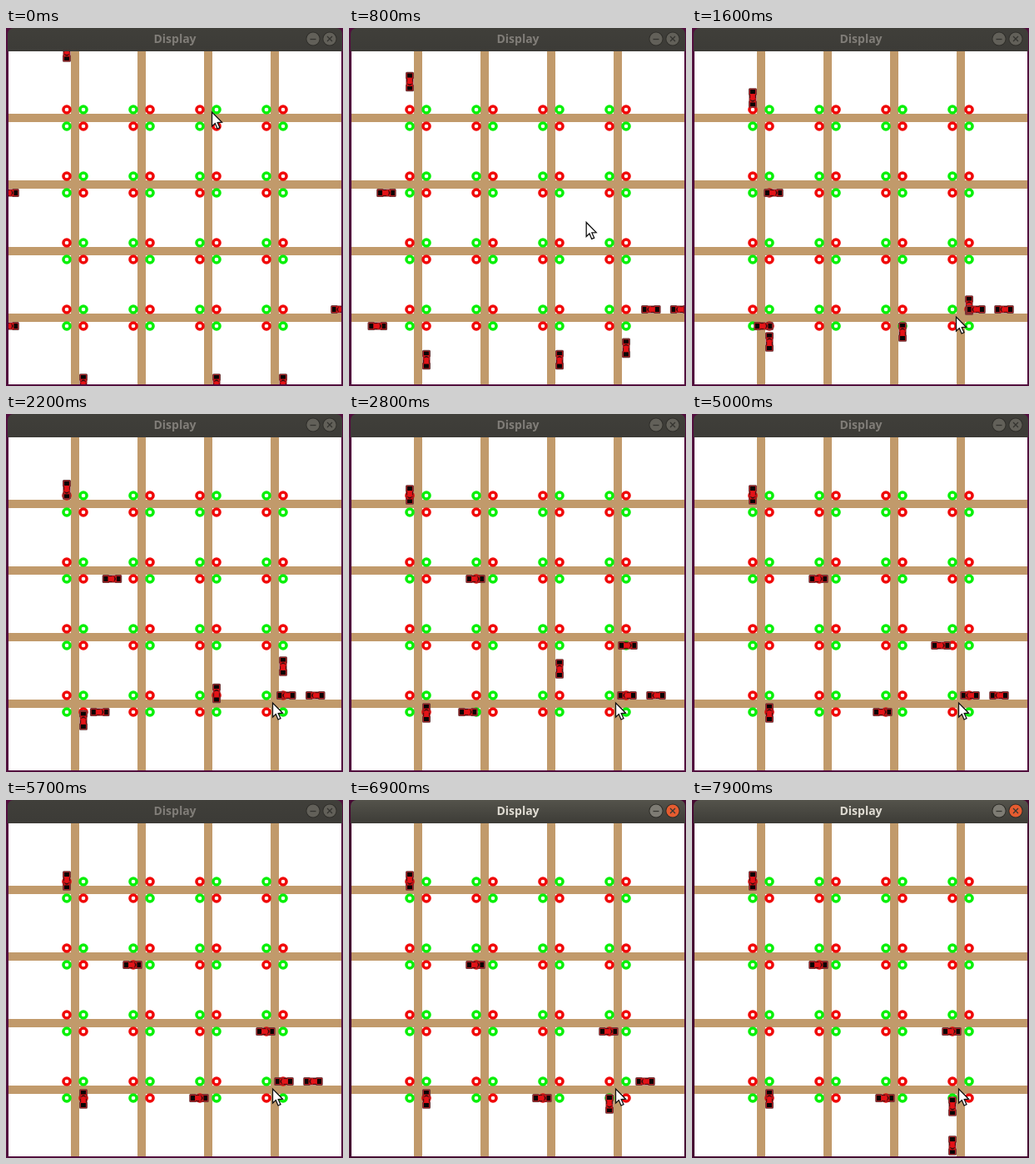
These frames come from a looping animation (405x430 px, 8000 ms). An HTML page with a canvas:

```html
<!DOCTYPE html>
<html>
<head>
<meta charset="utf-8">
<style>
  html, body { margin: 0; width: 405px; height: 430px; overflow: hidden; }
  canvas { display: block; }
</style>
</head>
<body>
<canvas id="stage" width="405" height="430"></canvas>
<script>
const ctx = document.getElementById('stage').getContext('2d');
const LOOP = 8000, STEP = 100;
const ROAD = '#c19a6b', RED = '#f00808', GREEN = '#08f008';
const RIGHT = 0, DOWN = 90, LEFT = 180, UP = -90;

// Keyframes: time, x, y, heading
const cars = [
  [[0, 73, 29, DOWN], [900, 73, 69, DOWN], [1600, 73, 84, DOWN], [1800, 73, 86, DOWN], [2700, 73, 97, DOWN]],
  [[0, 4, 198, RIGHT], [900, 50, 198, RIGHT], [1600, 98, 198, RIGHT], [2700, 152, 198, RIGHT]],
  [[0, 4, 358, RIGHT], [900, 38, 358, RIGHT], [1600, 86, 358, RIGHT], [2700, 135, 358, RIGHT], [2800, 143, 358, RIGHT],
   [3600, 190, 358, RIGHT], [3700, 201, 358, RIGHT], [4500, 219, 358, RIGHT], [5000, 229, 358, RIGHT], [5400, 232, 358, RIGHT]],
  [[0, 93, 427, UP], [900, 93, 395, UP], [1600, 93, 377, UP], [1800, 93, 375, UP], [2700, 93, 359, UP]],
  [[0, 253, 427, UP], [900, 253, 395, UP], [1600, 253, 365, UP], [2800, 253, 306, UP], [3500, 253, 282, UP],
   [3700, 252, 278, RIGHT], [5000, 299, 278, RIGHT], [5400, 307.5, 278, RIGHT], [5700, 312, 278, RIGHT]],
  [[0, 333, 427, UP], [900, 333, 379, UP], [1600, 333, 333, UP], [2600, 333, 283, UP], [2800, 335, 278, RIGHT],
   [3600, 378, 278, RIGHT], [3700, 386, 278, RIGHT], [4300, 420, 278, RIGHT]],
  [[0, 402, 338, LEFT], [900, 358, 338, LEFT], [1600, 341, 338, LEFT], [1800, 339, 338, LEFT], [2700, 334, 338, LEFT],
   [6600, 334, 338, LEFT], [6700, 324, 342, 150], [6900, 313, 365, DOWN], [7500, 313, 396, DOWN], [7900, 313, 415, DOWN]],
  [[0, 435, 338, LEFT], [900, 393, 338, LEFT], [1600, 375, 338, LEFT], [1800, 374, 338, LEFT], [2700, 369, 338, LEFT],
   [6600, 369, 338, LEFT], [6900, 356, 338, LEFT], [7300, 332, 338, LEFT], [7500, 318.5, 350, 135],
   [7700, 313, 360, DOWN], [7900, 313, 368, DOWN]]
];
const pointer = [[0, 247, 101], [100, 247, 101], [1400, 317, 347], [1600, 317, 347], [1800, 320, 347]];

function sample(keys, t) {
  const next = keys.findIndex(k => k[0] > t);
  if (next < 0) return keys[keys.length - 1].slice(1);
  const a = keys[next - 1], b = keys[next], p = (t - a[0]) / (b[0] - a[0]);
  return a.slice(1).map((v, i) => v + (b[i + 1] - v) * p);
}

function rect(color, x, y, w, h) {
  ctx.fillStyle = color;
  ctx.fillRect(x, y, w, h);
}

function shape(color, points) {
  ctx.fillStyle = color;
  ctx.beginPath();
  points.forEach(([x, y]) => ctx.lineTo(x, y));
  ctx.closePath();
  ctx.fill();
}

function disc(color, x, y, r) {
  ctx.fillStyle = color;
  ctx.beginPath();
  ctx.arc(x, y, r, 0, 7);
  ctx.fill();
}

function mix(a, b, p) {
  return `rgb(${a.map((v, i) => Math.round(v + (b[i] - v) * p))})`;
}

function light(x, y, green) {
  disc(green ? GREEN : RED, x, y, 5.8);
  disc('#fff', x, y, 2.3);
}

// Straight-through traffic shares a colour on each diagonal of a crossing.
function diagonalGreen(col, row, t) {
  if (row === 0) return col % 2 === 1;
  if (col === 1 && row === 3) return t < 2400;
  if (col === 3 && row === 3) return t < 6700;
  return col > 0;
}

function drawMap(t) {
  rect('#fff', 3, 28, 400, 400);
  for (let i = 0; i < 4; i++) {
    rect(ROAD, 78 + 80 * i, 28, 10, 400);
    rect(ROAD, 3, 103 + 80 * i, 400, 10);
  }
  for (let col = 0; col < 4; col++) {
    for (let row = 0; row < 4; row++) {
      const x = 83 + 80 * col, y = 108 + 80 * row, on = diagonalGreen(col, row, t);
      light(x - 10, y - 10, on);
      light(x + 10, y + 10, on);
      light(x + 10, y - 10, !on);
      light(x - 10, y + 10, !on);
    }
  }
}

function drawCar([x, y, heading]) {
  ctx.save();
  ctx.translate(x, y);
  ctx.rotate(heading * Math.PI / 180);
  ctx.fillStyle = '#70383a';
  ctx.beginPath();
  ctx.roundRect(-11.8, -5, 8.5, 10, 1.5);
  ctx.roundRect(3.3, -5, 8.5, 10, 1.5);
  ctx.fill();
  rect('#7c2022', -5, -4.5, 10, 9);
  rect('#cb1114', -10.5, -3.7, 21, 7.4);
  rect('#080505', -10, -3, 5, 6);
  rect('#080505', 5.5, -3, 4.5, 6);
  rect('#e31318', -4.5, -2.2, 8.5, 4.4);
  shape('#35100f', [[2, -3.5], [4.5, -1], [4.5, 1], [2, 3.5], [3, 0]]);
  rect('#521111', -4, -4, 4, 1);
  rect('#521111', -4, 3, 4, 1);
  ctx.restore();
}

function drawPointer([x, y]) {
  ctx.save();
  ctx.translate(x, y);
  ctx.beginPath();
  [[0.5, 0], [0.5, 17], [4.3, 13.5], [7, 20], [10, 18.7], [7.2, 12.5], [12.5, 12.2]].forEach(p => ctx.lineTo(...p));
  ctx.closePath();
  ctx.fillStyle = '#fff';
  ctx.strokeStyle = '#111';
  ctx.lineWidth = 1.3;
  ctx.fill();
  ctx.stroke();
  ctx.restore();
}

function button(x, fill, edge) {
  disc(edge, x, 13, 8.6);
  disc(fill, x, 13, 7.6);
}

function glyph(color, ...lines) {
  ctx.strokeStyle = color;
  ctx.lineWidth = 1.3;
  ctx.beginPath();
  for (const [x1, y1, x2, y2] of lines) {
    ctx.moveTo(x1, y1);
    ctx.lineTo(x2, y2);
  }
  ctx.stroke();
}

function drawFrame(focus) {
  rect(mix([82, 14, 62], [70, 9, 50], focus), 0, 0, 405, 430);
  const bar = ctx.createLinearGradient(0, 0, 0, 28);
  bar.addColorStop(0, mix([64, 63, 58], [84, 83, 75], focus));
  bar.addColorStop(1, mix([60, 59, 55], [61, 60, 55], focus));
  ctx.fillStyle = bar;
  ctx.beginPath();
  ctx.roundRect(2, 0, 402, 28, [7, 7, 0, 0]);
  ctx.fill();

  ctx.font = 'bold 14px "Noto Sans", "Open Sans", sans-serif';
  ctx.textAlign = 'center';
  ctx.fillStyle = mix([128, 125, 120], [223, 219, 210], focus);
  ctx.fillText('Display', 203, 18);

  const edge = mix([48, 47, 43], [46, 45, 40], focus);
  const mark = mix([52, 51, 47], [56, 55, 50], focus);
  button(369, mix([98, 96, 89], [126, 124, 116], focus), edge);
  glyph(mark, [365.5, 13.5, 372.5, 13.5]);
  button(389, mix([98, 96, 89], [230, 92, 48], focus), edge);
  glyph(mark, [386, 10, 392, 16], [392, 10, 386, 16]);
}

function draw(t) {
  drawFrame(Math.min(1, Math.max(0, (t - 6200) / 300)));
  ctx.save();
  ctx.beginPath();
  ctx.rect(3, 28, 400, 400);
  ctx.clip();
  drawMap(t);
  cars.forEach(keys => drawCar(sample(keys, t)));
  drawPointer(sample(pointer, t));
  ctx.restore();
}

const start = performance.now();
function tick() {
  const t = (performance.now() - start) % LOOP;
  draw(Math.floor(t / STEP) * STEP);
  requestAnimationFrame(tick);
}
tick();
</script>
</body>
</html>
```
